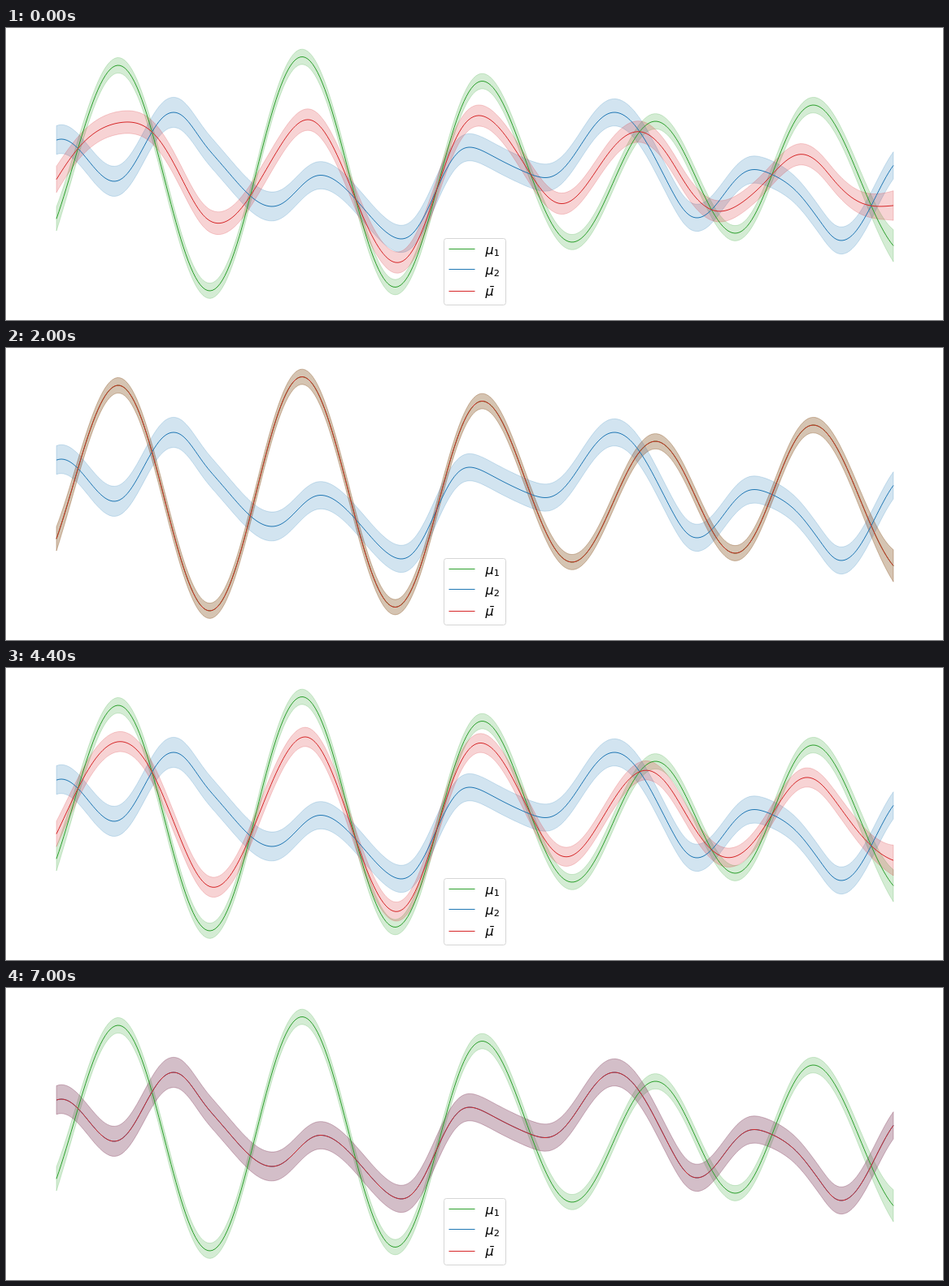
An HTML page that plays this animation: 1152 by 360 pixels, repeating every 8000 ms.

```html
<!DOCTYPE html>
<html lang="en">
<head>
<meta charset="utf-8">
<title>Interpolated mean curves</title>
<style>
  html, body { margin: 0; width: 100%; height: 100%; overflow: hidden; background: #fff; }
  svg { display: block; width: 100%; height: 100%; }
  .line { fill: none; stroke-width: 1; stroke-linejoin: round; }
  .band { fill-opacity: .2; stroke-opacity: .2; stroke-width: 1; }
  text { font: italic 16px "DejaVu Sans", sans-serif; }
  .sub { font-style: normal; font-size: 11.2px; }
  .bar { font-style: normal; }
</style>
</head>
<body>
<svg viewBox="0 0 1152 360">
  <g id="bands"></g>
  <g id="lines"></g>
  <rect x="538.5" y="259.5" width="76" height="82" rx="3" fill="#fff" fill-opacity=".8" stroke="#ccc" stroke-opacity=".8"/>
  <g id="legend"></g>
  <text x="589.5" y="278.5">μ<tspan class="sub" dy="2.5">1</tspan></text>
  <text x="589.5" y="303.5">μ<tspan class="sub" dy="2.5">2</tspan></text>
  <text x="589.5" y="329.5">μ</text>
  <text class="bar" x="593.5" y="329.5">¯</text>
</svg>
<script>
const LEFT = 62, RIGHT = 1091, STEP = 3;
const LOOP = 8000, TICK = 200;

const xs = [];
for (let x = LEFT; x <= RIGHT; x += STEP) xs.push(x);

// Smooth wave through its turning points [x, y] and inflections [x, y, slope].
// Curvature at a turning point is the mean of the cosine arcs on both sides.
function wave(keys) {
  const arc = ([x, y], next) => {
    if (!next) return [];
    const quarter = next[2] ? 4 : 2;
    return [Math.PI ** 2 / quarter * (next[1] - y) / (next[0] - x) ** 2];
  };
  const nodes = keys.map((key, i) => {
    const [x, y, slope = 0] = key;
    const arcs = [...arc(key, keys[i - 1]), ...arc(key, keys[i + 1])];
    const bend = slope ? 0 : arcs.reduce((sum, v) => sum + v) / arcs.length;
    return { x, y, slope, bend };
  });
  return x => {
    const i = Math.max(1, nodes.findIndex(n => n.x >= x));
    const p = nodes[i - 1], q = nodes[i], h = q.x - p.x;
    const u = (x - p.x) / h, v = 1 - u;
    // One end of a quintic Hermite segment
    const end = (n, s, t, dir) => s ** 3 * (
      n.y * (1 + 3 * t + 6 * t * t) + dir * n.slope * h * t * (1 + 3 * t) + n.bend * h * h * t * t / 2);
    return end(p, v, u, 1) + end(q, u, v, -1);
  };
}

const sample = (mean, dev) => ({ mean: xs.map(mean), dev: xs.map(dev) });

const green = sample(
  wave([[27, 290], [138, 46], [250.5, 324], [364, 35.5], [478.5, 319.5], [585.5, 65.5],
    [696, 264], [798.5, 115], [896.5, 253], [992.5, 95], [1110, 280]]),
  x => 9.4 + 5.4 * Math.exp((LEFT - x) / 20) + 10.4 * Math.exp((x - RIGHT) / 25));

const blue = sample(
  wave([[10, 180], [68, 137], [133, 189], [206, 104], [255, 156.5, 1.15], [327, 220],
    [387, 181.5], [486, 260], [570, 147], [663, 184.5], [748, 104], [804, 172, 1.95],
    [849.5, 234], [920, 174.5], [992, 226, 1.35], [1027, 262], [1111, 155]]),
  x => 16.7 + 1.9 * Math.exp(-(((x - 200) / 150) ** 4)));

const mix = (p, q, w) => p.map((v, i) => w * v + (1 - w) * q[i]);

function add(parent, cls, attrs) {
  const el = document.createElementNS('http://www.w3.org/2000/svg', 'path');
  el.setAttribute('class', cls);
  for (const key in attrs) el.setAttribute(key, attrs[key]);
  return document.getElementById(parent).appendChild(el);
}

function curve(color, legendY) {
  add('legend', 'line', { stroke: color, d: `M544.5 ${legendY}h32` });
  const band = add('bands', 'band', { fill: color, stroke: color });
  const line = add('lines', 'line', { stroke: color });
  const points = ys => ys.map((y, i) => xs[i] + ' ' + y.toFixed(2));
  return ({ mean, dev }) => {
    const top = points(mean.map((y, i) => y - dev[i]));
    const bottom = points(mean.map((y, i) => y + dev[i])).reverse();
    band.setAttribute('d', 'M' + top.concat(bottom).join('L') + 'Z');
    line.setAttribute('d', 'M' + points(mean).join('L'));
  };
}

const drawGreen = curve('#2ca02c', 272.5);
const drawBlue = curve('#1f77b4', 297.5);
const drawRed = curve('#d62728', 324.5);

const ticks = (t, start, max) =>
  Math.max(0, Math.min(max, Math.floor((t - start) / TICK) + 1));

// Weight of the green curve: up from a half to one, then down to zero
const weight = t => t < 3400 ? .5 + ticks(t, 400, 9) / 18 : 1 - ticks(t, 3400, 19) / 19;

function render(t) {
  const w = weight(t);
  drawRed({ mean: mix(green.mean, blue.mean, w), dev: mix(green.dev, blue.dev, w) });
}

drawGreen(green);
drawBlue(blue);
render(0);

let start;
function frame(now) {
  start ??= now;
  render((now - start) % LOOP);
  requestAnimationFrame(frame);
}
requestAnimationFrame(frame);
</script>
</body>
</html>
```
